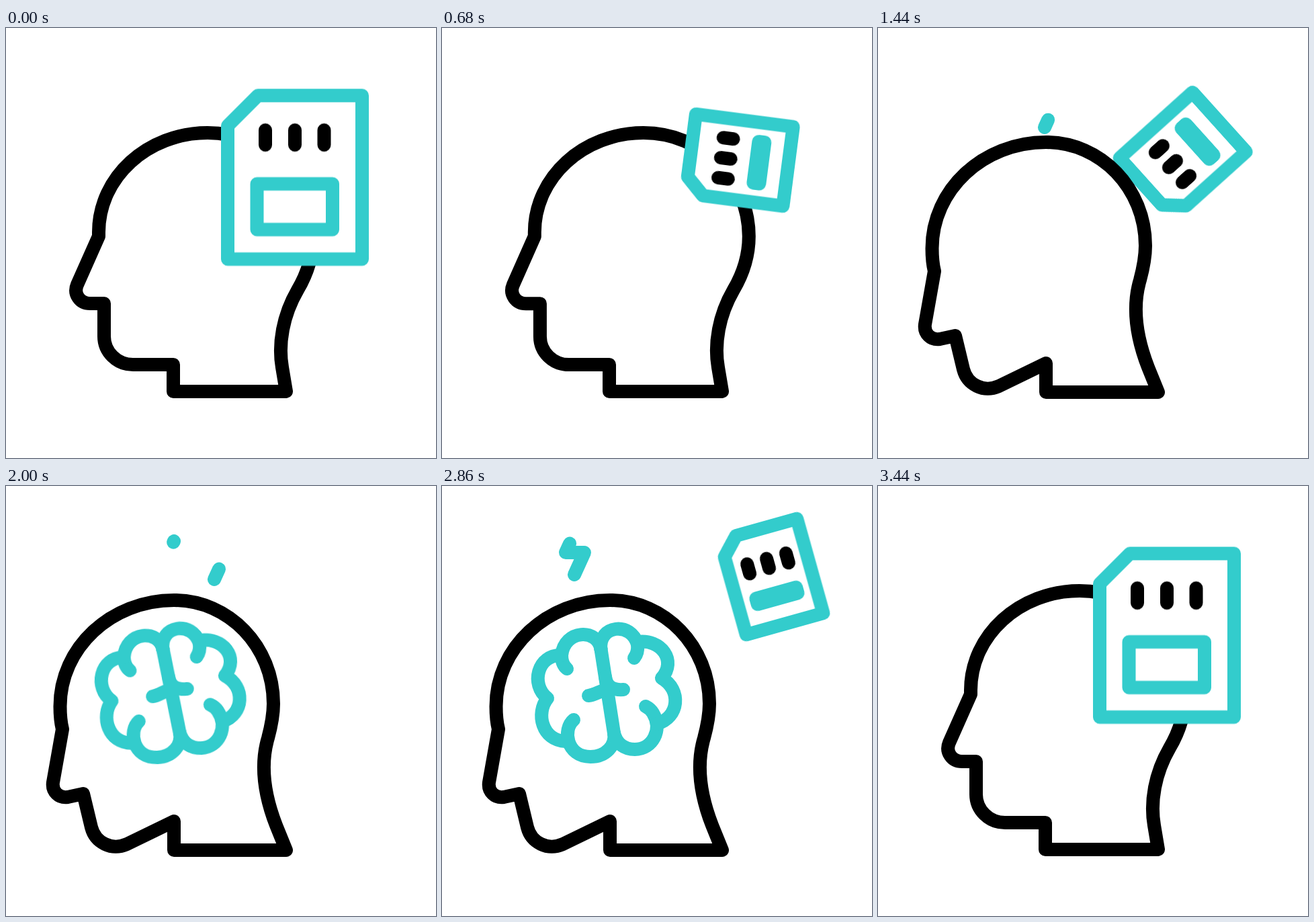
An HTML page that plays this animation: 640x640 px, repeating every 3600 ms.

```html
<!DOCTYPE html>
<html lang="en">
<head>
<meta charset="utf-8">
<title>Memory card and head</title>
<style>
  :root { --loop: 3.6s; --ease: cubic-bezier(.37, 0, .63, 1); --teal: #3cc; }
  html, body { margin: 0; width: 100%; height: 100%; overflow: hidden; background: #fff; }
  svg {
    position: absolute; inset: 0; width: 100%; height: 100%;
    fill: none; stroke: #000; stroke-width: 20; stroke-linecap: round; stroke-linejoin: round;
  }
  .teal { stroke: var(--teal); }
  .white { fill: #fff; }
  .scene { z-index: 2; }
  .card { z-index: 3; animation: layer var(--loop) step-end infinite; }

  .head, .place, .turn, .shell, .label, .pins, .brain { animation: var(--loop) var(--ease) infinite; }
  .head { animation-name: tilt; }
  .place { animation-name: place; }
  .turn { animation-name: turn; }
  .shell { animation-name: shell; }
  .label { animation-name: label; }
  .pins { animation-name: pins; }
  .brain { animation-name: brain; transform-origin: 245px 308px; }
  .brain path { vector-effect: non-scaling-stroke; }
  .bolt {
    opacity: 0; stroke-dasharray: 100 200;
    animation: zap var(--loop) var(--ease) var(--at) infinite;
  }

  /* the card slides in behind the head and returns in front of it */
  @keyframes layer { 0% { z-index: 3 } 36% { z-index: 1 } 80.2%, 100% { z-index: 3 } }

  @keyframes tilt {
    0%, 18.33%, 95.56%, 100% {
      d: path("M417 541L249 541L249 501L189 501C165 501 146 482 146 459L146 410L125 410C110 410 100 396 106 382L138 310C138 308 138 306 138 304C138 222 211 156 300 156C387 156 457 225 457 310C457 340 447 368 434 390C412 428 405 470 411 505Z");
    }
    34.17%, 80.56% {
      d: path("M417 542L250 542L250 499L180 533C157 543 133 531 127 508L115 458L92 463C79 465 68 455 70 441L84 362C81 350 80.5 340 80.5 328C80.5 241 156 170 250 170C332 170 398 239 398 324C398 344 394 360 390 375C379 412 383 456 402 505Z");
    }
  }

  @keyframes place {
    0%, 6.67% { transform: translate(430px, 222.5px); animation-timing-function: ease-in }
    11.11% { transform: translate(426.5px, 214.5px); animation-timing-function: linear }
    14.44% { transform: translate(435px, 200px); animation-timing-function: ease-out }
    21.11% { transform: translate(444px, 196px); animation-timing-function: ease-in }
    26.67% { transform: translate(458px, 191px); animation-timing-function: ease-out }
    33.89%, 37.22% { transform: translate(503.5px, 155px) }
    46.67%, 67.78% { transform: translate(255px, 324px) }
    79.44%, 80.56% { transform: translate(490.5px, 135px) }
    95.56%, 100% { transform: translate(430px, 222.5px) }
  }

  @keyframes turn {
    0%, 6.67%, 95.56%, 100% { transform: rotate(0deg) }
    27.78%, 68.33% { transform: rotate(-132deg) }
    79.44%, 80.56% { transform: rotate(-15.6deg) }
  }

  @keyframes shell {
    0%, 6.67%, 95.56%, 100% { d: path("M-55 -122L100 -122L100 121.5L-100 121.5L-100 -77Z") }
    18.06%, 80.56% { d: path("M-34.5 -73L59.5 -73L59.5 73L-59.5 73L-59.5 -47Z") }
  }
  @keyframes label {
    0%, 6.67%, 95.56%, 100% { d: path("M-56.5 9.5L56 9.5L56 77.5L-56.5 77.5Z") }
    18.06%, 80.56% { d: path("M-31 34L31 34L31 25L-31 25Z") }
  }
  @keyframes pins {
    0%, 6.67%, 95.56%, 100% { d: path("M-44 -70.5L-44 -48.5M0 -70.5L0 -48.5M43.5 -70.5L43.5 -48.5") }
    18.06%, 80.56% { d: path("M-30 -28L-30 -13M0 -28L0 -13M30 -28L30 -13") }
  }

  @keyframes brain {
    0%, 42.4% { opacity: 0; transform: rotate(-40deg) scale(0) }
    42.5% { opacity: 1; transform: rotate(-40deg) scale(.02) }
    54% { opacity: 1; transform: rotate(-3deg) scale(1) }
    60%, 80.56% { opacity: 1; transform: rotate(0deg) scale(1) }
    90% { opacity: 1; transform: rotate(-30deg) scale(.02) }
    90.1%, 100% { opacity: 0; transform: rotate(-30deg) scale(0) }
  }

  /* a bolt is drawn upward, then wiped the same way */
  @keyframes zap {
    0% { opacity: 1; stroke-dashoffset: 100 }
    20% { opacity: 1; stroke-dashoffset: -100 }
    20.01%, 100% { opacity: 0; stroke-dashoffset: -100 }
  }
</style>
</head>
<body>
<svg class="scene" viewBox="0 0 640 640">
  <defs>
    <path id="bolt" pathLength="100" d="M0 0L15 -33L-13 -33L2 -66"/>
  </defs>
  <path class="head white"/>
  <g class="brain teal">
    <path d="M236.5 243L256 368"/>
    <path d="M236.5 243C232 212 182 213 178 252C178 262 181 268 186 272"/>
    <path d="M178 252C142 250 131 296 157 316C139 338 149 379 184 380"/>
    <path d="M196 348C179 362 185 403 221 403C244 403 259 386 256 368"/>
    <path d="M256 368C260 384 272 392 287 392C313 392 329 363 314 338C311 333 307 330 303 328"/>
    <path d="M320 354C353 345 357 303 327 286C350 260 326 227 291 232"/>
    <path d="M236.5 243C232 207 282 201 291 236C292 245 290 251 286 256"/>
    <path d="M270 303C256 304 245 300 243 284M218 312C228 311 236 304 246 303"/>
  </g>
  <g class="teal">
    <use class="bolt" href="#bolt" x="248" y="148" style="--at: 1.325s"/>
    <use class="bolt" href="#bolt" x="310" y="139" style="--at: 1.865s"/>
    <use class="bolt" href="#bolt" x="197" y="132" style="--at: 2.55s"/>
  </g>
</svg>
<svg class="card" viewBox="0 0 640 640">
  <g class="place">
    <g class="turn">
      <path class="shell teal white"/>
      <path class="label teal"/>
      <path class="pins"/>
    </g>
  </g>
</svg>
</body>
</html>
```
